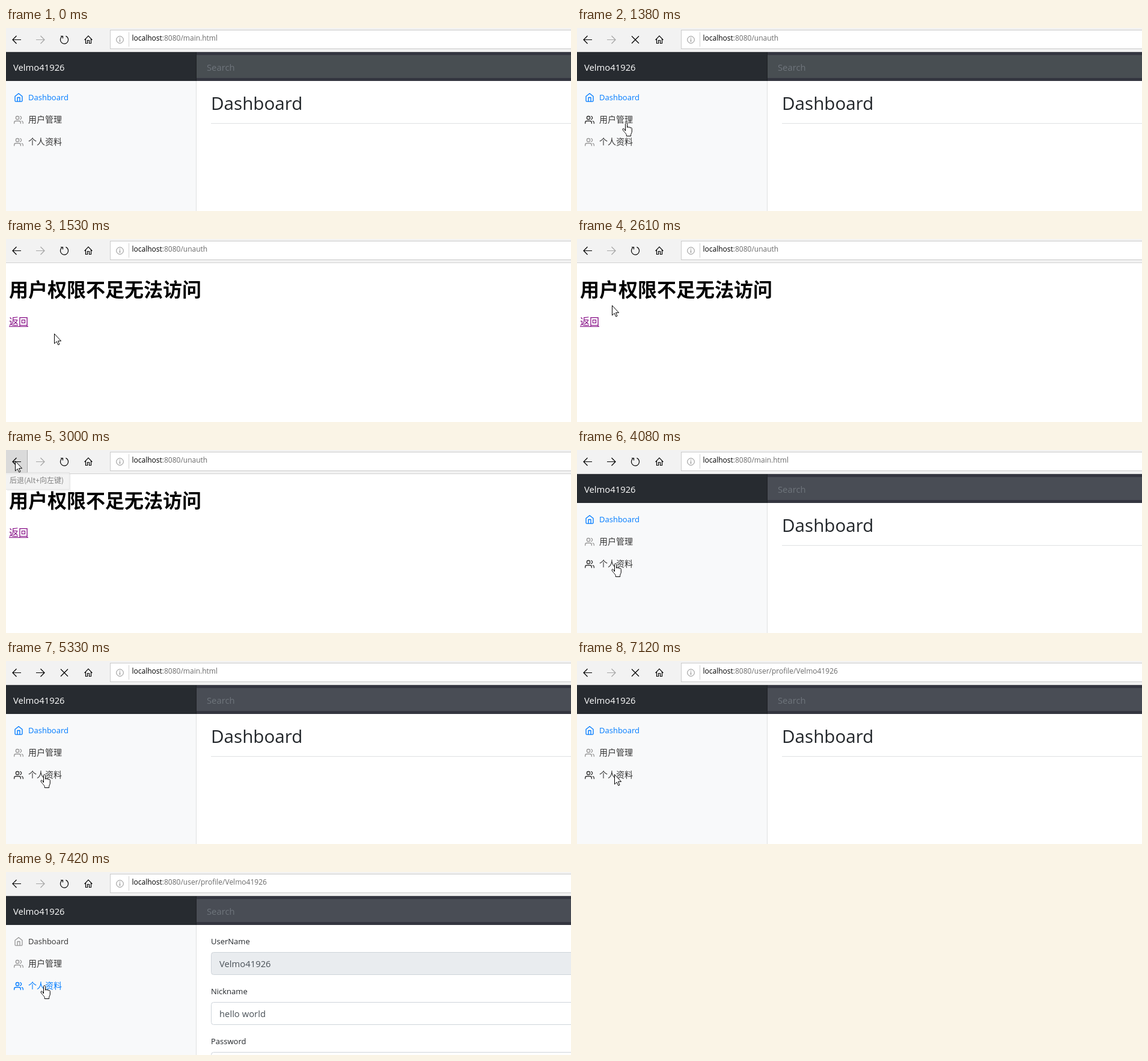
Animation, 940 px wide and 304 px high, one loop 8000 ms. Source, as an HTML page:

```html
<!DOCTYPE html>
<html lang="zh">
<head>
<meta charset="utf-8">
<title>Dashboard</title>
<style>
  html, body { margin: 0; width: 100%; height: 100%; overflow: hidden; background: #fff; }
  svg { display: block; width: 940px; height: 304px; }
  text { font-family: "Open Sans", "Noto Sans CJK SC", "Noto Sans CJK", sans-serif; font-size: 14.8px; fill: #212529; }
  .small { font-size: 13px; }
  .cjk { font-family: "Noto Sans CJK SC", "Noto Sans CJK", sans-serif; font-size: 14px; }
  .line { fill: none; stroke: #000; stroke-width: 1.2; }
  .icon { fill: none; stroke: currentColor; stroke-width: 2; stroke-linecap: round; stroke-linejoin: round; }
  .nav text { fill: #333; }
  .nav.active text { fill: #007bff; }
  .nav { color: #999; }
  .nav.hover { color: #333; }
  .nav.active { color: #007bff; }
  .field { fill: #fff; stroke: #ced4da; }
  .value { fill: #495057; }
  .pointer { fill: #fff; stroke: #000; stroke-linejoin: round; }
</style>
</head>
<body>
<svg viewBox="0 0 940 304">
  <defs>
    <g id="home" class="icon">
      <path d="M3 9l9-7 9 7v11a2 2 0 0 1-2 2H5a2 2 0 0 1-2-2zM9 22V12h6v10"/>
    </g>
    <g id="users" class="icon">
      <path d="M17 21v-2a4 4 0 0 0-4-4H5a4 4 0 0 0-4 4v2M23 21v-2a4 4 0 0 0-3-3.87M16 3.13a4 4 0 0 1 0 7.75"/>
      <circle cx="9" cy="7" r="4"/>
    </g>
  </defs>
  <rect width="940" height="304" fill="#fff"/>

  <g id="main">
    <rect y="88" width="317" height="216" fill="#f8f9fa"/>
    <path d="M316.5 88V304" stroke="#dfe0e1"/>
    <rect y="40" width="940" height="48" fill="#343640"/>
    <rect y="40" width="317" height="48" fill="#272b30"/>
    <path d="M316.5 40V88" stroke="#1e2124"/>
    <rect id="search" x="317" y="45" width="623" height="38"/>
    <text class="user" x="12" y="71" style="fill:#fff"></text>
    <text x="334" y="71" style="fill:#6f757c">Search</text>

    <g class="nav">
      <use href="#home" transform="translate(13 107.5) scale(.667)"/>
      <text class="small" x="37" y="120">Dashboard</text>
    </g>
    <g class="nav">
      <use href="#users" transform="translate(13 144.5) scale(.667)"/>
      <text class="cjk" x="37" y="157">用户管理</text>
    </g>
    <g class="nav">
      <use href="#users" transform="translate(13 181.5) scale(.667)"/>
      <text class="cjk" x="37" y="194">个人资料</text>
    </g>

    <g id="dashboard">
      <text x="341" y="136" style="font-size:29.6px">Dashboard</text>
      <path d="M341 158.5H940" stroke="#dfe1e3"/>
    </g>
    <g id="profile">
      <text class="small" x="341" y="120">UserName</text>
      <rect class="field" x="341.5" y="133.5" width="620" height="37" rx="4" style="fill:#e9ecef"/>
      <text class="user value" x="355" y="158"></text>
      <text class="small" x="341" y="203">Nickname</text>
      <rect class="field" x="341.5" y="216.5" width="620" height="37" rx="4"/>
      <text class="value" x="355" y="241">hello world</text>
      <text class="small" x="341" y="286">Password</text>
      <rect class="field" x="341.5" y="299.5" width="620" height="37" rx="4"/>
    </g>
  </g>

  <g id="unauth">
    <text class="cjk" x="5" y="96" style="font-size:32px;font-weight:700;fill:#000">用户权限不足无法访问</text>
    <text class="cjk" x="5" y="143" style="font-size:16px;fill:#800080">返回</text>
    <path d="M5 145.5H37" stroke="#800080"/>
  </g>

  <rect width="940" height="39" fill="#f2f2f2"/>
  <path d="M0 39.5H940" stroke="#d2d2d2"/>
  <rect id="backHover" x="-.5" y="-.5" width="36" height="38" stroke="#adadad"/>
  <path class="line" d="M25 19.5H10.8M17.5 13L11 19.5 17.5 26"/>
  <path class="line" id="forward" d="M50 19.5H64.2M57.5 13L64 19.5 57.5 26"/>
  <g id="reload" class="line">
    <path d="M99.5 13.4A6.6 6.6 0 1 1 93 14.3"/>
    <path d="M91 13.5H94.5V17.3"/>
  </g>
  <path class="line" id="stop" d="M91 13.5L103 25.5M103 13.5L91 25.5"/>
  <path class="line" d="M130.5 19.8L137 13.2 143.5 19.8M132.5 18V25.5H135.5V20.5H138.5V25.5H141.5V18"/>
  <rect x="173.5" y="3.5" width="780" height="31" fill="#fff" stroke="#cbcbcb"/>
  <circle cx="189.5" cy="19.5" r="5.8" fill="none" stroke="#888"/>
  <path d="M189.5 16V17.3M189.5 18.5V23" stroke="#777"/>
  <path d="M204.5 7V31" stroke="#d0d0d0"/>
  <text x="209.5" y="21" style="font-size:12px;fill:#000">localhost<tspan id="path" fill="#6b6b6b"></tspan></text>

  <g id="tooltip">
    <rect x="2" y="40" width="106" height="28" fill="#000" opacity=".06"/>
    <rect x="-.5" y="37.5" width="106" height="28" fill="#f0f0f0" stroke="#dcdcdc"/>
    <text class="cjk" x="6" y="55" style="font-size:12px;fill:#575757">后退(Alt+向左键)</text>
  </g>

  <g id="cursor">
    <path id="arrow" class="pointer" d="M.5 .5V16.8L4.2 13.3 6.8 18.9 9 17.9 6.5 12.4H11.6Z"/>
    <path id="hand" class="pointer" transform="translate(-5 0)"
      d="M5.5 14V2.2C5.5 .1 8.5 .1 8.5 2.2V8.4C8.5 6.6 11.3 6.7 11.3 8.7 11.3 7.1 14 7.4 14 9.3 14 8 16.3 8.3 16.3 10.3V15C16.3 17.5 14.6 18.5 14.6 20.3V22.5H7.3V20.5C7.3 18.8 2.4 14.8 1.2 12 .4 10 2.6 9.4 3.8 11Z"/>
  </g>
</svg>
<script>
  const LOOP = 8000;
  const USER = "Velmo41926";
  const $ = id => document.getElementById(id);
  const navs = document.querySelectorAll(".nav");
  document.querySelectorAll(".user").forEach(el => el.textContent = USER);

  // Each track holds its value until the next key.
  const urls = [[0, "main.html"], [1380, "unauth"], [3540, "main.html"], [7120, "user/profile/" + USER]];
  const pages = [[0, "dashboard"], [1450, "unauth"], [3690, "dashboard"], [7270, "profile"]];
  const loading = [[0, false], [1380, true], [1530, false], [3540, true], [3770, false], [5170, true], [7350, false]];
  const busy = [[0, false], [7120, true], [7420, false]];
  const forward = [[0, false], [3540, true], [7120, false]];
  const tip = [[0, 0], [3000, .75], [3080, 1], [3390, 0]];
  const moves = [
    [210, 468, 295], [520, 425, 276], [600, 310, 228], [680, 190, 186], [760, 115, 166], [840, 86, 159], [920, 80, 157],
    [2530, 76, 148], [2610, 58, 110], [2690, 34, 60], [2770, 19, 28], [2850, 15, 18],
    [3470, 24, 36], [3540, 52, 88], [3620, 76, 130], [3690, 79, 150], [3770, 74, 166],
    [3850, 68, 179], [3920, 64, 185], [4000, 62, 187], [4080, 62, 188]
  ];
  const at = (track, t) => track.findLast(key => key[0] <= t);
  const show = (id, on) => $(id).style.display = on ? "" : "none";

  function draw(t) {
    const page = at(pages, t)[1];
    const load = at(loading, t)[1];
    const spot = at(moves, t);
    const [, x, y] = spot || [0, -99, -99];
    const onMain = page !== "unauth";
    const row = onMain && x >= 0 && x < 316 ? Math.floor((y - 97) / 37) : -1;
    const hand = row >= 0 && row < 3 && !at(busy, t)[1];
    const active = page === "profile" ? 2 : 0;

    show("main", onMain);
    for (const name of ["unauth", "dashboard", "profile"]) show(name, page === name);
    navs.forEach((nav, i) => {
      nav.classList.toggle("active", i === active);
      nav.classList.toggle("hover", i === row);
    });
    $("search").setAttribute("fill", t < 3690 ? "#484e52" : "#494d55");

    $("path").textContent = ":8080/" + at(urls, t)[1];
    show("reload", !load);
    show("stop", load);
    $("forward").style.stroke = at(forward, t)[1] ? "#000" : "#a6a6a6";
    show("backHover", x >= 0 && x < 36 && y < 38);
    $("backHover").setAttribute("fill", t >= 3390 ? "#cfcfcf" : "#dadada");
    $("tooltip").style.opacity = at(tip, t)[1];

    show("cursor", spot);
    show("hand", hand);
    show("arrow", !hand);
    $("cursor").setAttribute("transform", `translate(${x} ${y})`);
  }

  const start = performance.now();
  function frame() {
    draw((performance.now() - start) % LOOP);
    requestAnimationFrame(frame);
  }
  frame();
</script>
</body>
</html>
```
